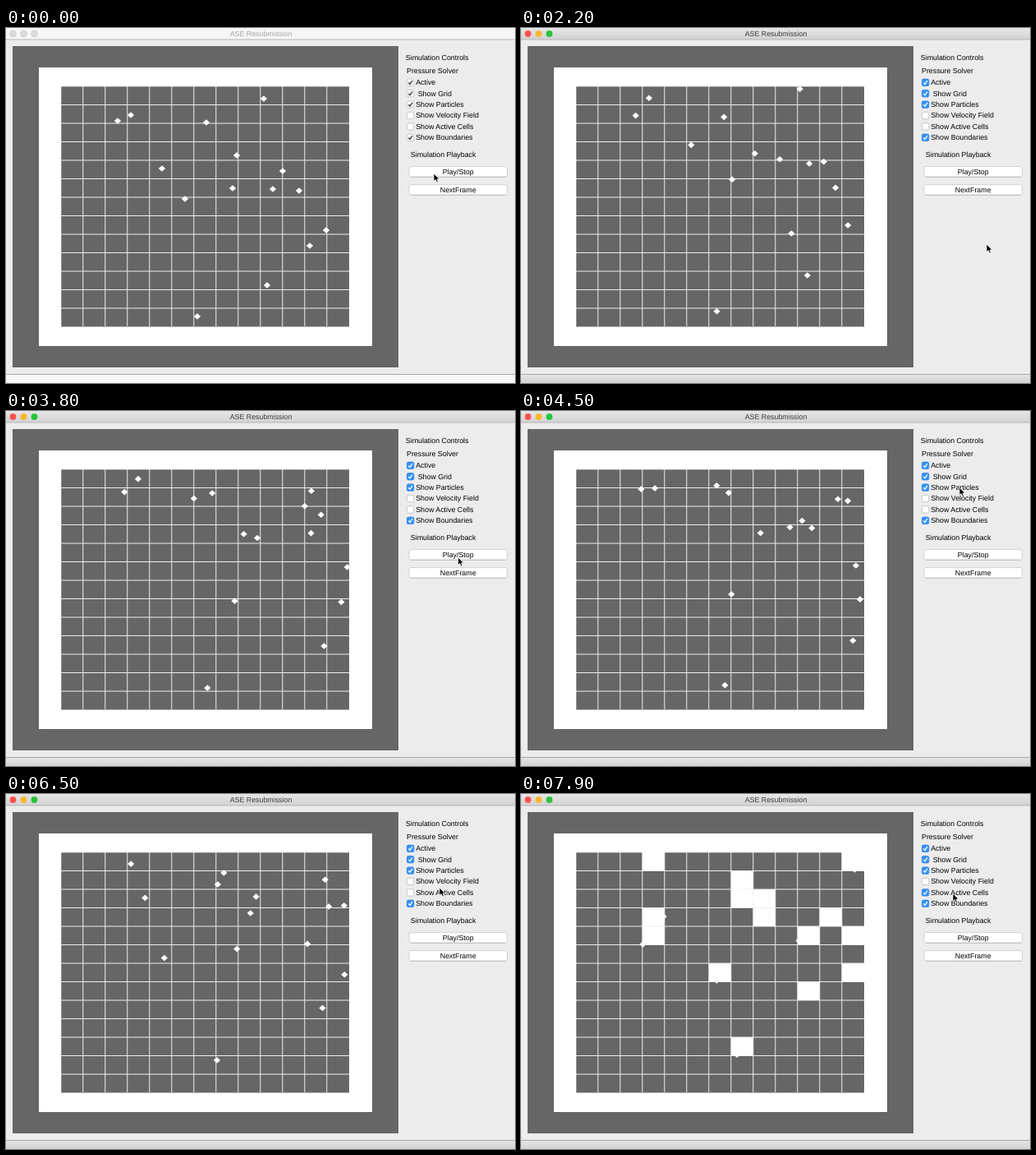
Animation, 620 px wide and 432 px high, one loop 8 s. Source, as an HTML page:

```html
<!DOCTYPE html>
<html lang="en">
<head>
<meta charset="utf-8">
<title>Simulation</title>
<style>
html, body { margin: 0; width: 620px; height: 432px; overflow: hidden; background: #ececec; }
svg { display: block; }
text { font: 8.85px "Liberation Sans", Arial, sans-serif; fill: #000; text-rendering: geometricPrecision; white-space: pre; }
.mid { text-anchor: middle; }
.box rect { fill: #fff; stroke: #bdbdbd; stroke-width: .8; }
.box path { fill: none; stroke: none; stroke-width: 1.3; }
.box.on path { stroke: #333; }
.active .box.on rect { fill: #3593f6; stroke: #2f86e6; }
.active .box.on path { stroke: #fff; }
#bar, #foot { fill: #f6f6f6; }
.active #bar, .active #foot { fill: url(#shade); }
#title { fill: #a5a5a5; }
.active #title { fill: #3c3c3c; }
#lights circle { fill: #dadada; stroke: #c6c6c6; stroke-width: .6; }
.active #lights circle { fill: var(--c); stroke: none; }
</style>
</head>
<body>
<svg id="stage" width="620" height="432" viewBox="0 0 620 432">
  <defs>
    <linearGradient id="shade" x2="0" y2="1"><stop stop-color="#e6e6e6"/><stop offset="1" stop-color="#d2d2d2"/></linearGradient>
  </defs>
  <rect width="620" height="432" fill="#ececec"/>
  <rect id="bar" width="620" height="14"/>
  <rect y="13.5" width="620" height="1" fill="#b8b8b8"/>
  <g id="lights"></g>
  <text id="title" class="mid" x="310.5" y="10.2">ASE Resubmission</text>
  <rect id="foot" y="421" width="620" height="11"/>
  <rect y="421" width="620" height="1" fill="#a8a8a8"/>
  <rect x="8" y="22" width="470" height="391" fill="#666"/>
  <rect x="40" y="48" width="406" height="339" fill="#fff"/>
  <rect x="67.3" y="71.3" width="350.7" height="292.2" fill="#666"/>
  <path id="cells" fill="#fff"/>
  <path id="grid" stroke="#eee" fill="none"/>
  <path id="dots" fill="#fff"/>
  <text x="486.8" y="39.2">Simulation Controls</text>
  <text x="488" y="54.6">Pressure Solver</text>
  <g id="checks"></g>
  <text x="492.8" y="157.2">Simulation Playback</text>
  <g id="buttons"></g>
  <path id="cursor" d="M0 0V9.6L2.2 7.6 3.8 11 5.5 10.3 4 7H7Z" fill="#000" stroke="#fff" stroke-width=".8"/>
</svg>
<script>
const $ = id => document.getElementById(id);
const LEFT = 67, TOP = 71, CW = 27, CH = 22.5, N = 13;
const LOOP = 8000, STEP = 100, START = 0.92, FOCUS = 500, SHOW_CELLS = 7300, GLIDE = 600;

// Starting x, y and velocity in px/s; optional obstacles closer than the walls
const particles = [
  [314, 86, 20.1, -14.3],
  [152, 106, 3.1, -16.2],
  [136, 113, 2.9, -5],
  [244, 115, 2.5, -5.2, { top: 98 }],
  [281, 155, 3, -1.8],
  [190, 171, 13.5, -22.4],
  [337, 174, 24.8, -8.8, { right: 390 }],
  [276, 195, 30.6, -27.5, { right: 364, top: 115 }],
  [325, 196, 20.4, -24.2, { right: 416, left: 391, top: 99 }],
  [357, 198, 20.4, -2.8],
  [218, 208, 30.6, -18.6, { top: 85 }],
  [390, 246, 6.4, -4.7],
  [370, 265, -31.75, -11.75],
  [318, 313, 24.1, -9.4],
  [233, 351, 4.3, -4.85],
];

// Departure time and destination of each cursor move
const home = [521, 177];
const moves = [[1500, 567, 263], [3500, 534, 93], [4600, 528, 114], [6500, 526, 121]];

// Past the first obstacle, bounce back and forth between both
function bounce(p, hit, back) {
  const beyond = (p - hit) * Math.sign(hit - back);
  if (beyond <= 0) return p;
  const gap = Math.abs(hit - back), d = beyond % (2 * gap);
  return hit + Math.sign(back - hit) * (d < gap ? d : 2 * gap - d);
}

function spotAt(s, [x, y, vx, vy, { right = 419, left = LEFT, top = TOP } = {}]) {
  return [bounce(x + vx * s, right, left), bounce(y + vy * s, top, 363)];
}

const smooth = u => u * u * (3 - 2 * u);
const clamp = (v, lo, hi) => Math.max(lo, Math.min(hi, v));

function cursorAt(t) {
  return moves.reduce(([x, y], [start, toX, toY]) => {
    const e = smooth(clamp((t - start) / GLIDE, 0, 1));
    return [x + (toX - x) * e, y + (toY - y) * e];
  }, home);
}

const snap = (p, origin, size) => origin + size * clamp(Math.floor((p - origin) / size), 0, N - 1);
const cellPath = ([x, y]) => `M${snap(x, LEFT, CW)} ${snap(y, TOP, CH)}h${CW}v${CH}h${-CW}z`;
const diamond = ([x, y]) => `M${x - 4.1} ${y}l4.1-3.8 4.1 3.8-4.1 3.8z`;

function build() {
  $("lights").innerHTML = ["#fb534f", "#fcb62f", "#28c43c"]
    .map((c, i) => `<circle cx="${8.5 + 13 * i}" cy="7" r="3.9" style="--c:${c}"/>`).join("");

  let grid = "";
  for (let i = 1; i < N; i++)
    grid += `M${LEFT + i * CW - .2} ${TOP}v292M${LEFT} ${TOP + i * CH}h351`;
  $("grid").setAttribute("d", grid);

  const labels = ["Active", " Show Grid", "Show Particles", "Show Velocity Field", "Show Active Cells", "Show Boundaries"];
  $("checks").innerHTML = labels.map((label, i) => `
    <g transform="translate(488 ${61.7 + 13.4 * i})">
      <g class="box ${i == 3 || i == 4 ? "" : "on"}"><rect x=".4" y=".4" width="8.4" height="8.4" rx="1.6"/><path d="M2.3 4.8 4 6.7 7 2.3"/></g>
      <text x="11.2" y="7.4">${label}</text>
    </g>`).join("");

  $("buttons").innerHTML = ["Play/Stop", "NextFrame"].map((label, i) => `
    <g transform="translate(0 ${22 * i})">
      <rect x="491" y="168.6" width="119.5" height="12.6" rx="2.5" fill="#fff" stroke="#c8c8c8" stroke-width=".8"/>
      <path d="M493 181.3h115.5" stroke="#aaa" stroke-width=".6"/>
      <text class="mid" x="550.7" y="177.8">${label}</text>
    </g>`).join("");
}

function draw(now) {
  const t = Math.floor(now % LOOP / STEP) * STEP;
  const s = Math.max(0, t / 1000 - START);
  const spots = particles.map(p => spotAt(s, p));
  const cellsOn = t >= SHOW_CELLS;

  $("stage").classList.toggle("active", t >= FOCUS);
  $("dots").setAttribute("d", spots.map(diamond).join(""));
  $("cells").setAttribute("d", cellsOn ? spots.map(cellPath).join("") : "");
  document.querySelectorAll(".box")[4].classList.toggle("on", cellsOn);
  $("cursor").setAttribute("transform", `translate(${cursorAt(t)})`);
}

build();
const begin = performance.now();
function tick() {
  draw(performance.now() - begin);
  requestAnimationFrame(tick);
}
tick();
</script>
</body>
</html>
```
